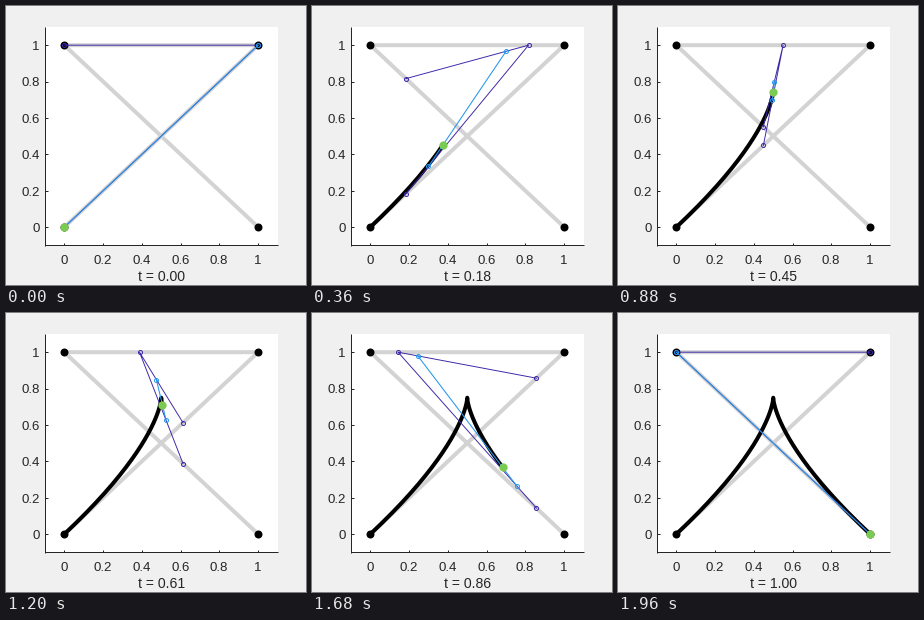
A matplotlib script for the animation above (2 s loop, 300 by 279 pixels).

```python
import numpy as np
import matplotlib.pyplot as plt
from matplotlib.animation import FuncAnimation
from matplotlib.patches import Rectangle

W, H, DPI = 300, 279, 100
FRAMES, INTERVAL = 50, 40
PT = 72 / DPI  # points per pixel

INK = "#262626"
GREY = "#d3d3d3"
PURPLE = "#3e26a8"
BLUE = "#2797eb"
GREEN = "#7bcb52"

LEFT, RIGHT, TOP, BOTTOM = 39, 271.5, 21, 239.3
CONTROL = np.array([(0, 0), (1, 1), (0, 1), (1, 0)], float)

plt.rcParams["font.family"] = "Liberation Sans"


def to_px(points):
    """Map data in [-0.1, 1.1] to stage pixels."""
    p = (np.asarray(points, float) + 0.1) / 1.2
    x = LEFT + p[..., 0] * (RIGHT - LEFT)
    y = BOTTOM - p[..., 1] * (BOTTOM - TOP)
    return np.stack([x, y], axis=-1)


def lerp_all(points, t):
    return points[:-1] * (1 - t) + points[1:] * t


def levels(t):
    """De Casteljau levels below the control polygon."""
    out, pts = [], CONTROL
    while len(pts) > 1:
        pts = lerp_all(pts, t)
        out.append(pts)
    return out


fig = plt.figure(figsize=(W / DPI, H / DPI), dpi=DPI, facecolor="#f0f0f0")
ax = fig.add_axes([0, 0, 1, 1])
ax.set_xlim(0, W)
ax.set_ylim(H, 0)
ax.axis("off")


def stroke(xs, ys, color, width, **kw):
    return ax.plot(xs, ys, color=color, lw=width * PT, **kw)[0]


def dots(color, size, **kw):
    return ax.plot([], [], "o", color=color, ms=size * PT, mew=0, **kw)[0]


def construction(color, width, z):
    return stroke([], [], color, width, marker="o", ms=4 * PT, mfc="none",
                  mec=color, mew=1 * PT, zorder=z)


def draw_axes():
    ax.add_patch(Rectangle((LEFT, TOP), 272 - LEFT, 240 - TOP,
                           fc="white", ec="none", zorder=0))
    # kept below .5 so that snapping stays on this pixel
    x0, y0 = 39.2, 239.2
    line = dict(zorder=1, solid_capstyle="butt")
    stroke([x0, x0], [TOP, 240], INK, 1, **line)
    stroke([LEFT, 272], [y0, y0], INK, 1, **line)
    for v in np.arange(6) / 5:
        x, y = to_px((v, v))
        label = f"{v:g}"
        stroke([x, x], [y0, y0 - 2.5], INK, 1, **line)
        stroke([x0, x0 + 2.5], [y, y], INK, 1, **line)
        ax.text(x - 0.3, 258.5, label, color=INK, size=13.3 * PT,
                ha="center", va="baseline")
        ax.text(33.8, y + 4.8, label, color=INK, size=13.3 * PT,
                ha="right", va="baseline")


draw_axes()
polygon = to_px(CONTROL)
stroke(*polygon.T, GREY, 4, zorder=2, solid_joinstyle="round")
trail = stroke([], [], "black", 4, zorder=3, solid_joinstyle="round",
               solid_capstyle="butt")
dots("black", 8, zorder=4).set_data(*polygon.T)
first = construction(PURPLE, 0.95, 5)
second = construction(BLUE, 1.05, 6)
tip = dots(GREEN, 8.3, zorder=7)
caption = ax.text((LEFT + RIGHT) / 2 + 0.6, 275, "", color=INK, size=14 * PT,
                  ha="center", va="baseline")

times = np.linspace(0, 1, FRAMES)
curve = to_px([levels(t)[-1][0] for t in times])


def update(i):
    t = times[i]
    for artist, pts in zip((first, second, tip), levels(t)):
        artist.set_data(*to_px(pts).T)
    trail.set_data(*curve[:i + 1].T)
    caption.set_text(f"t = {t:.2f}")
    return first, second, tip, trail, caption


anim = FuncAnimation(fig, update, frames=FRAMES, interval=INTERVAL,
                     init_func=lambda: update(0), repeat=True, repeat_delay=0)
plt.show()
```
